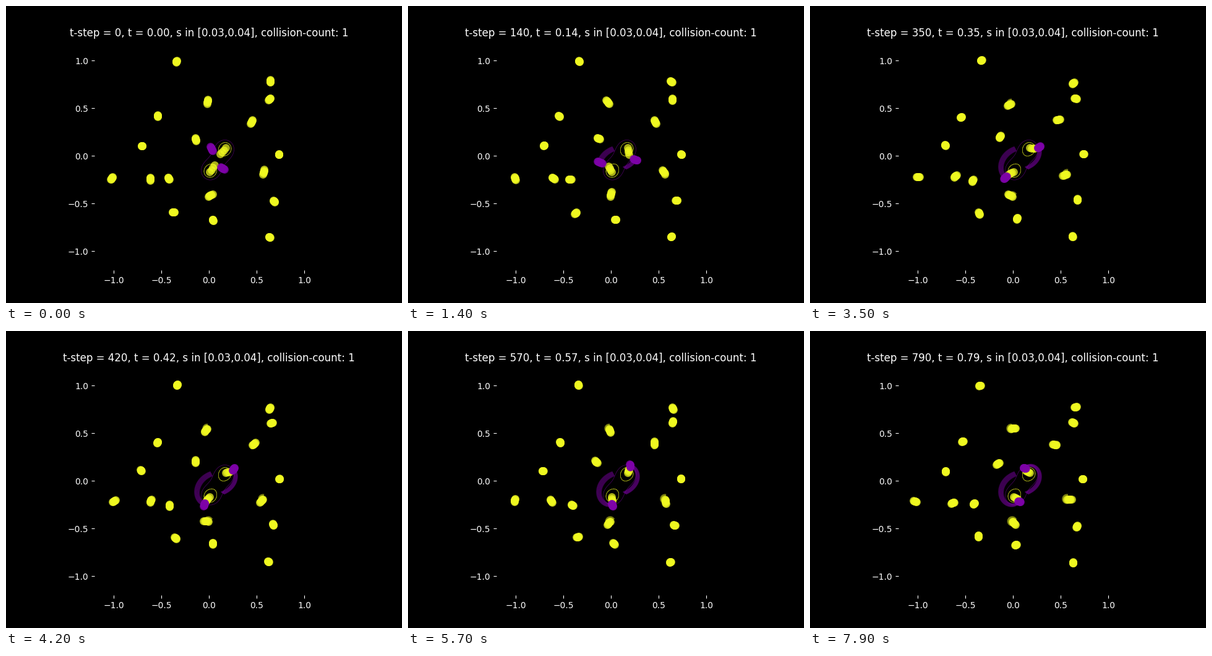
A matplotlib script for the animation above (8 s loop, 640 by 480 pixels).

```python
import numpy as np
import matplotlib.pyplot as plt
from matplotlib.animation import FuncAnimation
from matplotlib.collections import LineCollection

FRAMES = 80
YELLOW, PURPLE = "#f0f921", "#7e03a8"
SCALE = 154
TURN = 3.6  # degrees per frame
CHAIN = np.linspace(0, 1, 7)
INNER = np.linspace(0, 1, 4)
STRANDS = np.linspace(0, 1, 10)

# stage pixels as complex numbers, y pointing down
LOW, HIGH = 329 + 268.3j, 355 + 229.3j

# x, y, radius and starting angle of each small orbit
ORBITS = np.array([
    (275.6, 88.2, 2.6, 263), (427, 123.3, 4, 90), (427, 149, 4.2, 225),
    (325, 157.5, 7, 80), (245.1, 178.7, 2.6, 94), (398, 184.2, 6.3, 245),
    (305.5, 213, 5, 290), (218.7, 225.8, 1.9, 340), (441.3, 239.2, 1.3, 244),
    (172, 276, 5.2, 238), (232.7, 276.7, 5.4, 277), (263.5, 280.2, 3.8, 119),
    (415.3, 271.5, 7.4, 75), (326.8, 307.5, 7.5, 26), (432, 314.3, 3.2, 316),
    (272.3, 333.3, 3.8, 170), (333.6, 344.5, 3, 292), (424.6, 373.2, 2, 346),
])
X, Y, RADIUS, PHASE = ORBITS.T
HUBS = X + 1j * Y


def data(z):
    """Complex stage pixels to axes points."""
    z = np.asarray(z)
    return np.stack([(z.real - 328) / SCALE, (242.4 - z.imag) / SCALE], axis=-1)


def polar(r, degrees):
    return r * np.exp(-1j * np.radians(degrees))


def orbit(k):
    """Arms of the small orbits at frame k."""
    return polar(RADIUS, PHASE + TURN * k)


def spiral(k, start, rate, brake, floor, reach, decay):
    """Turning arm that shrinks towards a floor length."""
    return polar(floor + reach * np.exp(-k / decay), start + rate * k - brake * k**2)


def strand(k, s):
    """Purple strand s of the low and the high bundle."""
    shape = 9.5 + 2.5 * s, 18 + 7 * s
    low = spiral(k, 82 + 6 * s, 4.15, 0.0145, shape[0], 25 + 4 * s, shape[1])
    high = spiral(k, 256 + 10 * s, 2.98, 0, shape[0], 22.5, shape[1])
    return LOW + low, HIGH + high


def cassini(level):
    """Curves around both centres on which the distance product is constant."""
    mid, half = (LOW + HIGH) / 2, (HIGH - LOW) / 2
    t = np.linspace(0, 4 * np.pi, 400)
    w = np.abs(half)**2 + level * np.exp(1j * t)
    root = np.sqrt(np.abs(w)) * np.exp(0.5j * np.unwrap(np.angle(w)))
    root *= half / np.abs(half)
    return [data(mid + root), data(mid - root)]


def yellow_dots(k):
    small = HUBS + CHAIN[:, None] * orbit(k)
    low = LOW + INNER * spiral(k, 55, 4.75, 0.015, 5.5, 8, 35)
    high = HIGH + INNER * spiral(k, 228, TURN, 0, 5.5, 8, 35)
    return data(np.concatenate([small.ravel(), low, high]))


def yellow_lines(k):
    arcs = orbit(np.linspace(0, k, k + 2)[:, None])
    return [data(h + f * arm) for h, arm in zip(HUBS, arcs.T) for f in CHAIN[1:]]


def purple_lines(k):
    t = np.linspace(0, k, 2 * k + 2)
    return [data(path) for s in STRANDS for path in strand(t, s)]


plt.style.use("dark_background")
fig, ax = plt.subplots(figsize=(6.4, 4.8), dpi=100, facecolor="black")
ax.set(xlim=(-1.2, 1.2), ylim=(-1.2, 1.2), aspect="equal", facecolor="black",
       xticks=np.arange(-1, 1.1, 0.5), yticks=np.arange(-1, 1.1, 0.5))
for spine in ax.spines.values():
    spine.set_visible(False)
title = ax.set_title("", fontsize=12)


def add_lines(segments, color, width, alpha, z):
    lines = LineCollection(segments, colors=color, linewidths=width,
                           alpha=alpha, zorder=z)
    return ax.add_collection(lines, autolim=False)


def add_dots(color, z):
    return ax.scatter([], [], s=86, color=color, alpha=0.7, linewidths=0, zorder=z)


add_lines(cassini(738)[:1], PURPLE, 0.5, 0.6, 1)
add_lines(cassini(466), YELLOW, 0.5, 0.6, 2)
trails = add_lines([], PURPLE, 1, 0.36, 1)
arcs = add_lines([], YELLOW, 1, 0.5, 2)
yellow = add_dots(YELLOW, 3)
purple = add_dots(PURPLE, 4)


def update(k):
    title.set_text(f"t-step = {10 * k}, t = {k / 100:.2f}, "
                   "s in [0.03,0.04], collision-count: 1")
    lines = purple_lines(k)
    trails.set_segments(lines)
    arcs.set_segments(yellow_lines(k))
    yellow.set_offsets(yellow_dots(k))
    purple.set_offsets([line[-1] for line in lines])
    return title, trails, arcs, yellow, purple


anim = FuncAnimation(fig, update, frames=FRAMES, interval=100, repeat=True,
                     repeat_delay=0, blit=False)
plt.show()
```
